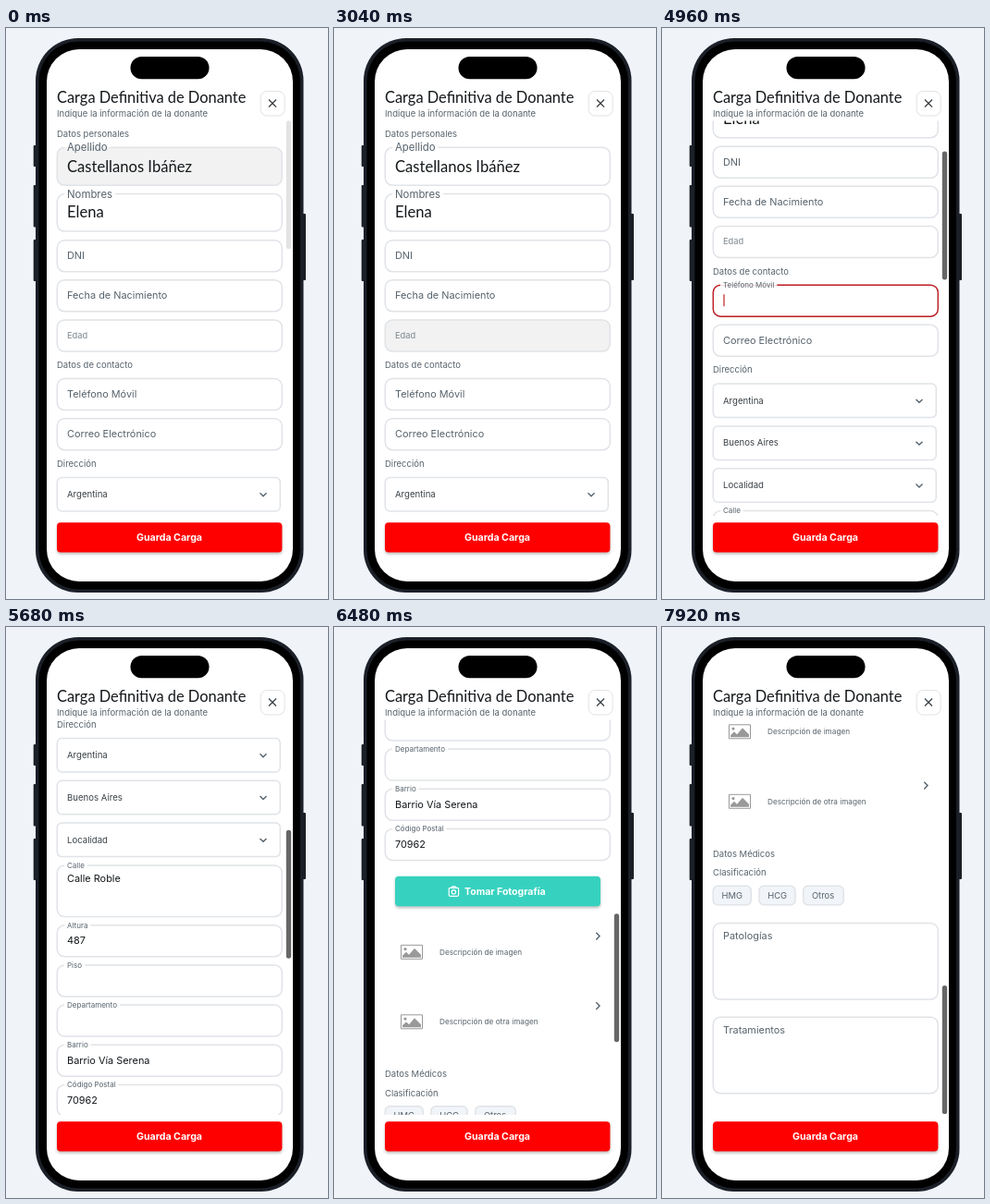
Write an HTML page with a canvas that moves like this. It is 348x618 px and loops after 8 s.

```html
<!DOCTYPE html>
<html lang="es">
<head>
<meta charset="utf-8">
<title>Carga de donante</title>
<style>
html, body { margin: 0; height: 100%; overflow: hidden; background: #f0f4f8; }
canvas { display: block; width: 348px; height: 618px; }
</style>
</head>
<body>
<canvas id="stage"></canvas>
<script>
const W = 348, H = 618, LOOP = 8000, STEP = 80;
const canvas = document.getElementById('stage');
const ctx = canvas.getContext('2d');
const ratio = window.devicePixelRatio || 1;
canvas.width = W * ratio;
canvas.height = H * ratio;

const INK = '#14181b', SOFT_INK = '#3a4046', GREY = '#57636c', LINE = '#e0e3e7', RED = '#bf2026';
const SANS = 'Inter, "Open Sans", sans-serif', DISPLAY = 'Lato, "Open Sans", sans-serif';
const VIEW_TOP = 100.5, VIEW_BOTTOM = 528;

const ramp = (t, a, b) => Math.min(1, Math.max(0, (t - a) / (b - a)));
const mix = (a, b, p) => a + (b - a) * p;
const pulse = (t, a, b) => ramp(t, a, a + 160) * (1 - ramp(t, b, b + 160));

// Scroll offset while the thumb is dragged: [time, offset]
const DRAG = [[4560, 0], [4880, 72], [5680, 366], [6080, 532.5], [6480, 643], [6960, 835], [7200, 881.5]];
function scrollAt(t) {
  for (let i = 1; i < DRAG.length; i++) {
    const [t0, y0] = DRAG[i - 1], [t1, y1] = DRAG[i];
    if (t < t1) return mix(y0, y1, ramp(t, t0, t1));
  }
  return DRAG[DRAG.length - 1][1];
}

function box(x, y, w, h, r, fill, stroke, width = 1.5) {
  ctx.beginPath();
  ctx.roundRect(x, y, w, h, r);
  if (fill) { ctx.fillStyle = fill; ctx.fill(); }
  if (stroke) { ctx.strokeStyle = stroke; ctx.lineWidth = width; ctx.stroke(); }
}

// Text whose capitals are centred on y
function text(str, x, y, size, color = GREY, weight = 400, family = SANS) {
  ctx.font = `${weight} ${size}px ${family}`;
  ctx.fillStyle = color;
  ctx.fillText(str, x, y + size * 0.36);
}

function line(color, width, ...points) {
  ctx.beginPath();
  points.forEach(([x, y]) => ctx.lineTo(x, y));
  ctx.strokeStyle = color;
  ctx.lineWidth = width;
  ctx.stroke();
}

function shadowed(draw) {
  ctx.save();
  ctx.shadowColor = 'rgba(0,0,0,.25)';
  ctx.shadowBlur = 3 * ratio;
  ctx.shadowOffsetY = 2 * ratio;
  draw();
  ctx.restore();
}

// Outlined field; float runs from 0 (label inside) to 1 (label on the border)
function field(label, y, h, o = {}) {
  const { float = 0, hover = 0, focus = 0, value, big, size = 10.9, color = GREY, hint, caret = 0 } = o;
  const textY = o.textY || y + h / 2 - 0.5;
  const shade = Math.round(255 - 13 * hover);
  const fill = `rgb(${shade},${shade},${shade})`;
  box(55.3, y, 243, h, 8, fill, LINE);
  if (focus) {
    ctx.globalAlpha = focus;
    box(55.3, y, 243, h, 8, null, RED, 1.4);
    ctx.globalAlpha = 1;
  }
  const labelSize = mix(size, big ? 11.4 : 8, float);
  if (float) {
    ctx.font = `400 ${labelSize}px ${SANS}`;
    const gap = (ctx.measureText(label).width + 6) * float;
    ctx.fillStyle = '#fff';
    ctx.fillRect(63, y - 1.5, gap, 1.5);
    ctx.fillStyle = fill;
    ctx.fillRect(63, y, gap, 1.5);
  }
  text(label, 66, mix(textY, y, float), labelSize, color);
  if (value) text(value, 66, textY, big ? 16.6 : 10.9, INK, 400, big ? DISPLAY : SANS);
  if (hint && float) {
    ctx.globalAlpha = float;
    text(hint, 66, textY, 9.85);
    ctx.globalAlpha = 1;
  }
  if (caret) {
    ctx.globalAlpha = caret;
    line(RED, 1.2, [67, textY - 6.5], [67, textY + 6.5]);
    ctx.globalAlpha = 1;
  }
}

// Field state for keyboard focus between two times
function focused(t, start, end) {
  const p = pulse(t, start, end);
  const phase = (t - start) % 1000;
  const blink = phase < 640 ? 1 - ramp(phase, 480, 640) : ramp(phase, 880, 1000);
  return { float: p, focus: p, caret: t > start && t < end ? blink : 0 };
}

function select(label, y) {
  box(55.3, y, 241, 36.5, 5, '#fff', LINE);
  text(label, 66, y + 18, 9.6, SOFT_INK);
  line(GREY, 1.4, [274.5, y + 16.8], [278, y + 20.2], [281.5, y + 16.8]);
}

function photoRow(label, y) {
  box(72.5, y - 7.5, 23, 15, 0, '#fff', '#999', 1);
  ctx.fillStyle = '#999';
  ctx.beginPath();
  ctx.arc(77, y - 3.2, 1.6, 0, 7);
  ctx.fill();
  ctx.beginPath();
  [[74, 6], [74, 4], [78, 0], [81, 3], [87, -4], [94, 3], [94, 6]].forEach(([x, dy]) => ctx.lineTo(x, y + dy));
  ctx.fill();
  text(label, 114, y, 8.2);
  line(GREY, 1.4, [283.3, y - 21], [287, y - 17.2], [283.3, y - 13.4]);
}

function photoButton(y) {
  shadowed(() => box(66, y, 222, 32.5, 4, '#37d2bf'));
  const cy = y + 16.5;
  box(124.2, cy - 4, 10.4, 9, 1.2, null, '#fff', 1.2);
  line('#fff', 1.2, [127, cy - 4], [128, cy - 5.4], [131, cy - 5.4], [132, cy - 4]);
  ctx.beginPath();
  ctx.arc(129.4, cy + 0.5, 2.2, 0, 7);
  ctx.stroke();
  text('Tomar Fotografía', 141, cy, 10.5, '#fff', 700);
}

function chip(label, x, w) {
  box(x, 1161.7, w, 20.5, 5, '#f1f4f8', LINE);
  text(label, x + 9.2, 1172, 9.4);
}

function form(t) {
  text('Datos personales', 55, 114.5, 9.5);
  field('Apellido', 129.3, 41, { float: 1, big: true, value: 'Castellanos Ibáñez', textY: 150, hover: 1 - ramp(t, 400, 640) });
  field('Nombres', 179.6, 40.5, { float: 1, big: true, value: 'Elena', textY: 199.5, hover: pulse(t, 640, 1120) });
  field('DNI', 229.7, 34, { ...focused(t, 1440, 2480), hover: pulse(t, 1120, 1360), hint: 'Ingrese DNI sin puntos' });
  field('Fecha de Nacimiento', 272.7, 34, { hover: pulse(t, 1600, 2720) });
  field('Edad', 316, 34, { size: 9.3, color: '#7d868d', hover: pulse(t, 2880, 3680) });
  text('Datos de contacto', 55, 364.7, 9.5);
  field('Teléfono Móvil', 379.6, 34, { ...focused(t, 3840, LOOP), hover: pulse(t, 3680, 3840) });
  field('Correo Electrónico', 422.7, 34);

  text('Dirección', 55, 471.2, 9.5);
  ['Argentina', 'Buenos Aires', 'Localidad'].forEach((s, i) => select(s, 486.5 + 45.8 * i));
  field('Calle', 624, 55.5, { float: 1, value: 'Calle Roble', textY: 638 });
  ['Altura', 'Piso', 'Departamento', 'Barrio', 'Código Postal'].forEach((label, i) =>
    field(label, 688.8 + 43.15 * i, 34, { float: 1, value: ['487', '', '', 'Barrio Vía Serena', '70962'][i] }));

  photoButton(912.8);
  photoRow('Descripción de imagen', 994.8);
  photoRow('Descripción de otra imagen', 1070.3);

  text('Datos Médicos', 55, 1127, 9.5);
  text('Clasificación', 55, 1147.3, 9.5);
  chip('HMG', 55.3, 41);
  chip('HCG', 105, 39);
  chip('Otros', 152.7, 43.5);
  field('Patologías', 1202, 82.5, { textY: 1216 });
  field('Tratamientos', 1303.7, 82.5, { textY: 1317.8 });
}

function phone() {
  ctx.fillStyle = '#f0f4f8';
  ctx.fillRect(0, 0, W, H);
  [[29.7, 127, 23], [29.7, 170, 45.5], [29.7, 229, 45], [319.5, 201, 72]].forEach(([x, y, h]) => box(x, y, 4.5, h, 1, '#1b1f27'));
  box(32, 11, 289.5, 600, 46, '#1b1f27');
  box(35.5, 14.5, 282.5, 593, 43, '#000');
  box(44, 23, 266, 576, 35, '#fff');
  box(134.5, 31, 85, 24.3, 12.2, '#000');
}

function header() {
  text('Carga Definitiva de Donante', 55, 75, 16.4, INK, 400, DISPLAY);
  text('Indique la información de la donante', 55, 93, 9.5);
  box(275.2, 68.5, 26, 26.5, 7, '#fff', LINE, 1);
  line(SOFT_INK, 1.2, [284, 77.5], [292, 85.5]);
  line(SOFT_INK, 1.2, [292, 77.5], [284, 85.5]);
}

function draw(t) {
  const scroll = scrollAt(t);
  ctx.setTransform(ratio, 0, 0, ratio, 0, 0);
  phone();
  header();

  ctx.save();
  ctx.beginPath();
  ctx.rect(44, VIEW_TOP, 266, VIEW_BOTTOM - VIEW_TOP);
  ctx.clip();
  ctx.translate(0, -scroll);
  form(t);
  ctx.restore();

  const thumb = 0.11 * (1 - ramp(t, 400, 800)) + 0.6 * ramp(t, 4240, 4640);
  if (thumb) box(302.8, 100.3 + scroll * 0.3265, 5.4, 139, 2.7, `rgba(0,0,0,${thumb})`);

  shadowed(() => box(55, 535.2, 243.4, 32.2, 4, '#f00'));
  text('Guarda Carga', 141, 551.5, 10.6, '#fff', 700);
}

const begin = performance.now();
function tick() {
  const t = (performance.now() - begin) % LOOP;
  draw(Math.floor(t / STEP) * STEP);
  requestAnimationFrame(tick);
}
tick();
</script>
</body>
</html>
```
